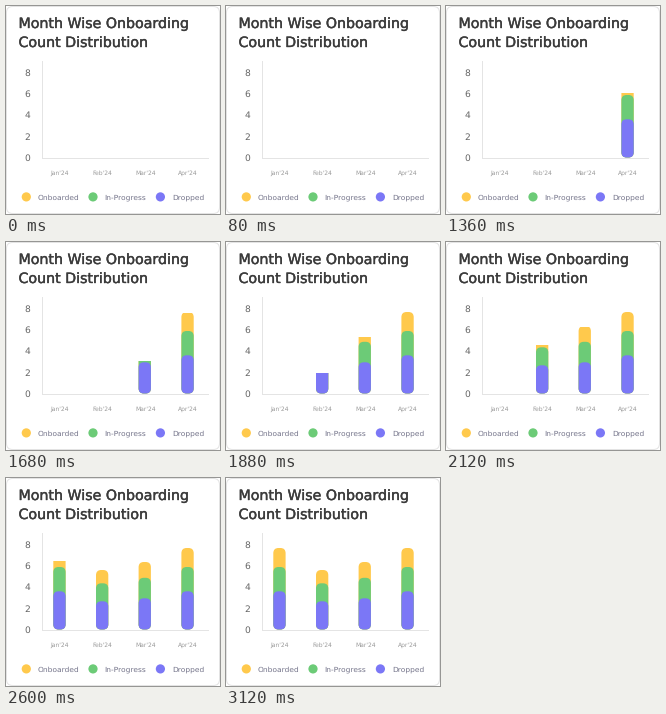
Recreate the animation shown at these times as a matplotlib script. Size 214x208 px, loop 4040 ms.

```python
import matplotlib.pyplot as plt
from matplotlib.animation import FuncAnimation
from matplotlib.patches import Circle, FancyBboxPatch, Rectangle
from matplotlib.patheffects import withStroke

W, H, DPI = 214, 208, 100
STEP, LOOP = 40, 4040
REVEAL = 880
BASE = 151.5
BAR_W = 12.3
YELLOW, GREEN, PURPLE = "#ffc94c", "#6ccb77", "#7b77f6"

# label, left edge, reveal start (ms), tops of yellow / green / purple
BARS = [
    ("Jan'24", 47.3, 2240, (70, 89, 113.3)),
    ("Feb'24", 90, 1780, (92, 105.3, 123.3)),
    ("Mar'24", 132.6, 1530, (84, 99.8, 120.3)),
    ("Apr'24", 175.4, 1038, (70, 89, 113.3)),
]
LEGEND = [("Onboarded", 20.3, YELLOW), ("In-Progress", 87, GREEN),
          ("Dropped", 154.4, PURPLE)]

plt.rcParams.update({"font.family": "DejaVu Sans", "text.hinting": "none"})
fig = plt.figure(figsize=(W / DPI, H / DPI), dpi=DPI, facecolor="white")
ax = fig.add_axes([0, 0, 1, 1])
ax.set_xlim(0, W)
ax.set_ylim(H, 0)
ax.axis("off")


def px(n):
    return n * 72 / DPI


def text(x, y, s, size, color, ha="left", weight=0):
    t = ax.text(x, y, s, fontsize=px(size), color=color, ha=ha, va="baseline")
    if weight:
        t.set_path_effects([withStroke(linewidth=px(weight), foreground=color)])


def rounded(x, y, w, h, r, **style):
    box = FancyBboxPatch((x, y), w, h, boxstyle=f"round,pad=0,rounding_size={r}",
                         **style)
    return ax.add_patch(box)


def ease(t):
    t = min(max(t, 0), 1)
    return 1 - (1 - t) ** 3.5


rounded(0.5, 0.5, W - 1, H - 1, 6, fc="white", ec="#e3e3e3", lw=px(1))
text(12.5, 22, "Month Wise Onboarding", 14.2, "#3b3b3b", weight=0.4)
text(12.5, 41, "Count Distribution", 14.2, "#3b3b3b", weight=0.4)

for value in range(0, 9, 2):
    text(21.7, 155 - value * 10.63, str(value), 9.2, "#666666", ha="center")
ax.plot([36.5, 36.5], [55, 152], color="#e4e4e4", lw=px(1))
ax.plot([36, 202], [151.5, 151.5], color="#e4e4e4", lw=px(1))

for name, x, color in LEGEND:
    ax.add_patch(Circle((x, 190.9), 4.6, fc=color, lw=0))
    text(x + 11.7, 194, name, 7.5, "#74748a")

columns = []
for label, x, start, tops in BARS:
    text(x + BAR_W / 2 + 0.5, 168.8, label, 6, "#9a9a9a", ha="center")
    parts = [rounded(x, top, BAR_W, BASE - top, 5.2, fc=color, lw=0, zorder=3)
             for top, color in zip(tops, (YELLOW, GREEN, PURPLE))]
    columns.append((x, start, tops[0], parts))


def draw(i):
    now = i * STEP
    shown = []
    for x, start, top, parts in columns:
        edge = BASE - (BASE - top) * ease((now - start) / REVEAL)
        window = Rectangle((x - 2, edge), BAR_W + 4, BASE + 1 - edge,
                           transform=ax.transData)
        for part in parts:
            part.set_visible(now > start)
            part.set_clip_path(window)
        shown += parts
    return shown


anim = FuncAnimation(fig, draw, frames=LOOP // STEP, interval=STEP,
                     init_func=lambda: draw(0), repeat=True, repeat_delay=0,
                     blit=False)
plt.show()
```
